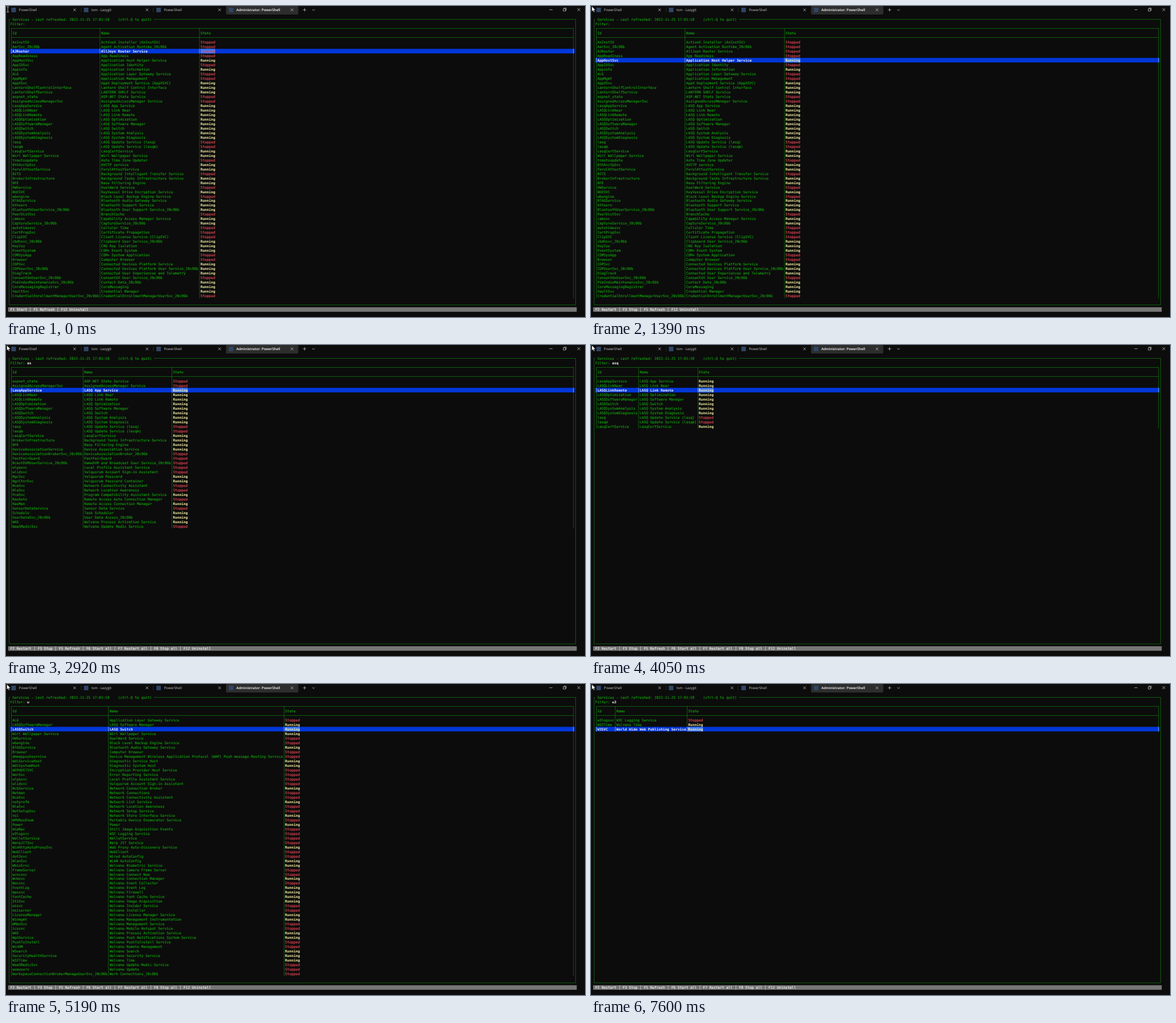
An HTML page for the animation above (8000 ms loop, 1021 by 548 pixels).

```html
<!DOCTYPE html>
<html lang="en">
<head>
<meta charset="utf-8">
<title>Services</title>
<style>
html, body { margin: 0; width: 100%; height: 100%; overflow: hidden; background: #0c0c0c; }
svg { display: block; width: 100%; height: 100%; }
text { white-space: pre; text-rendering: geometricPrecision; font-kerning: none; font-variant-ligatures: none; }
.mono { font-family: "DejaVu Sans Mono", monospace; font-size: 6.192px; stroke-width: .17px; }
.tab { font-family: "Open Sans", sans-serif; font-size: 6.1px; }
.b { font-weight: 700; stroke-width: 0; }
</style>
</head>
<body>
<svg viewBox="0 0 1021 548" preserveAspectRatio="none">
  <g id="bar"></g>
  <g id="screen" class="mono"></g>
  <g id="pointer"></g>
</svg>
<script>
// One service per line: state letter, id, then the name when it differs.
const services = `
SAxInstSV|ActiveX Installer (AxInstSV)
SAarSvc_20c96b|Agent Activation Runtime_20c96b
SAJRouter|AllJoyn Router Service
SAppReadiness|App Readiness
RAppHostSvc|Application Host Helper Service
SAppIDSvc|Application Identity
RAppinfo|Application Information
SALG|Application Layer Gateway Service
SAppMgmt|Application Management
RAppXSvc|AppX Deployment Service (AppXSVC)
RLanternShelfControlInterface|Lantern Shelf Control Interface
RLanternShelfService|LANTERN SHELF Service
Saspnet_state|ASP.NET State Service
SAssignedAccessManagerSvc|AssignedAccessManager Service
RLasqAppService|LASQ App Service
RLASQLinkNear|LASQ Link Near
RLASQLinkRemote|LASQ Link Remote
RLASQOptimization|LASQ Optimization
RLASQSoftwareManager|LASQ Software Manager
RLASQSwitch|LASQ Switch
RLASQSystemAnalysis|LASQ System Analysis
RLASQSystemDiagnosis|LASQ System Diagnosis
Slasq|LASQ Update Service (lasq)
Slasqm|LASQ Update Service (lasqm)
RLasqCertService
RWirl Wallpaper Service
Stzautoupdate|Auto Time Zone Updater
RBthAvctpSvc|AVCTP service
RFerulAttestService
SBITS|Background Intelligent Transfer Service
RBrokerInfrastructure|Background Tasks Infrastructure Service
RBFE|Base Filtering Engine
SDWService|DuelWard Service
RBDESVC|KeyVessel Drive Encryption Service
Swbengine|Block Level Backup Engine Service
RBTAGService|Bluetooth Audio Gateway Service
Rbthserv|Bluetooth Support Service
RBluetoothUserService_20c96b|Bluetooth User Support Service_20c96b
SPeerDistSvc|BranchCache
Rcamsvc|Capability Access Manager Service
RCaptureService_20c96b
Sautotimesvc|Cellular Time
SCertPropSvc|Certificate Propagation
SClipSVC|Client License Service (ClipSVC)
Rcbdhsvc_20c96b|Clipboard User Service_20c96b
RKeyIso|CNG Key Isolation
REventSystem|COM+ Event System
SCOMSysApp|COM+ System Application
SBrowser|Computer Browser
RCDPSvc|Connected Devices Platform Service
RCDPUserSvc_20c96b|Connected Devices Platform User Service_20c96b
RDiagTrack|Connected User Experiences and Telemetry
SConsentUxUserSvc_20c96b|ConsentUX User Service_20c96b
RPimIndexMaintenanceSvc_20c96b|Contact Data_20c96b
RCoreMessagingRegistrar|CoreMessaging
RVaultSvc|Credential Manager
SCredentialEnrollmentManagerUserSvc_20c96b
RCryptSvc|Cryptographic Services
RDsSvc|Data Sharing Service
RDusmSvc|Data Usage
RDcomLaunch|DCOM Server Process Launcher
RDoSvc|Delivery Optimization
RDeviceAssociationService|Device Association Service
RDeviceInstall|Device Install Service
Sdmwappushservice|Device Management Wireless Application Protocol (WAP) Push message Routing Service
SDeviceAssociationBrokerSvc_20c96b|DeviceAssociationBroker_20c96b
RWdiServiceHost|Diagnostic Service Host
RWdiSystemHost|Diagnostic System Host
SFastFairGuard
SWEPHOSTSVC|Encryption Provider Host Service
SWerSvc|Error Reporting Service
SBcastDVRUserService_20c96b|GameDVR and Broadcast User Service_20c96b
Swlpasvc|Local Profile Assistant Service
Swlidsvc|Velquorum Account Sign-in Assistant
RNgcSvc|Velquorum Passcard
RNgcCtnrSvc|Velquorum Passcard Container
RNcbService|Network Connection Broker
SNetman|Network Connections
SNcaSvc|Network Connectivity Assistant
Rnetprofm|Network List Service
SNlaSvc|Network Location Awareness
SNetSetupSvc|Network Setup Service
Rnsi|Network Store Interface Service
SWPDBusEnum|Portable Device Enumerator Service
RPower
RPcaSvc|Program Compatibility Assistant Service
SRasAuto|Remote Access Auto Connection Manager
RRasMan|Remote Access Connection Manager
SSensorDataService|Sensor Data Service
SWiaRpc|Still Image Acquisition Events
RSchedule|Task Scheduler
RUserDataSvc_20c96b|User Data Access_20c96b
Sw3logsvc|W3C Logging Service
SWalletService
SWarpJITSvc|Warp JIT Service
RWinHttpAutoProxySvc|Web Proxy Auto-Discovery Service
SWebClient
Sdot3svc|Wired AutoConfig
RWlanSvc|WLAN AutoConfig
RWbioSrvc|Wolvane Biometric Service
SFrameServer|Wolvane Camera Frame Server
Swcncsvc|Wolvane Connect Now
RWcmsvc|Wolvane Connection Manager
SWecsvc|Wolvane Event Collector
REventLog|Wolvane Event Log
Rmpssvc|Wolvane Firewall
RFontCache|Wolvane Font Cache Service
RStiSvc|Wolvane Image Acquisition
Swisvc|Wolvane Insider Service
Smsiserver|Wolvane Installer
RLicenseManager|Wolvane License Manager Service
RWinmgmt|Wolvane Management Instrumentation
SWManSvc|Wolvane Management Service
Sicssvc|Wolvane Mobile Hotspot Service
RWAS|Wolvane Process Activation Service
RWpnService|Wolvane Push Notifications System Service
SPushToInstall|Wolvane PushToInstall Service
SWinRM|Wolvane Remote Management
RWSearch|Wolvane Search
RSecurityHealthService|Wolvane Security Service
RW32Time|Wolvane Time
SWaaSMedicSvc|Wolvane Update Medic Service
Swuauserv|Wolvane Update
SWorkspaceConnectionBrokerManageUserSvc_20c96b|Work Connections_20c96b
RW3SVC|World Wide Web Publishing Service
Sworkfolderssvc|Work Folders
RLanmanWorkstation|Workstation
SWwanSvc|WWAN AutoConfig
`.trim().split("\n").map(line => {
  const [id, name = id] = line.slice(1).split("|");
  return { id, name, state: line[0] === "R" ? "Running" : "Stopped" };
});

// time, filter, selected row, caret visible
const steps = [
  [0, "", 2, 0], [130, "", 2, 1], [650, "", 2, 0], [1120, "", 3, 0], [1190, "", 3, 1],
  [1390, "", 4, 1], [1860, "", 3, 1], [1990, "", 2, 1], [2520, "", 2, 0],
  [2590, "a", 2, 0], [2720, "a", 2, 1], [2920, "as", 2, 1], [3120, "asq", 2, 1], [3850, "asq", 2, 0],
  [4050, "asq", 2, 1], [4190, "as", 2, 1], [4320, "a", 2, 0], [4460, "a", 2, 1], [4590, "", 2, 1],
  [5120, "", 2, 0], [5190, "w", 2, 0], [5260, "w", 2, 1], [5460, "w3", 2, 1],
  [5930, "w3", 2, 0], [6540, "w3", 2, 1], [7070, "w3", 2, 0], [7600, "w3", 2, 1]
];
const LOOP = 8000, POINTER_AT = 70;

// The terminal grid has cells of 7 by 15 dots and lines one dot wide.
const DOT = .5325, CW = 7 * DOT, CH = 15 * DOT;
const MAX_ROWS = 57, FIRST = 5, LAST_COL = 267;
const GREEN = "#13a10e", BLUE = "#0037da", BRIGHT_BLUE = "#3b78ff", WHITE = "#f2f2f2";
const STATE = { Running: "#f9f1a5", Stopped: "#e74856" };
const cx = col => 3.73 + col * CW;
const cy = row => 19.6 + row * CH;
const midX = col => cx(col) + 3 * DOT;
const midY = row => cy(row) + 7 * DOT;
const $ = id => document.getElementById(id);

const rect = (x, y, w, h, fill, extra = "") =>
  `<rect x="${x}" y="${y}" width="${w}" height="${h}" fill="${fill}" ${extra}/>`;
const text = (col, row, str, fill = GREEN, bold = false) =>
  `<text x="${cx(col)}" y="${cy(row) + 12 * DOT}" fill="${fill}" stroke="${fill}"${bold ? ' class="b"' : ""}>${str}</text>`;
const hline = (x1, x2, y) => rect(x1, y, x2 - x1, DOT, GREEN);
const vline = (x, y1, y2, fill = GREEN) => rect(x, y1, DOT, y2 - y1, fill);
const stroke = (d, color = "#d8d8d8", w = .7) =>
  `<path d="${d}" fill="none" stroke="${color}" stroke-width="${w}"/>`;
const cross = (x, y, r) => stroke(`M${x - r} ${y - r}l${2 * r} ${2 * r}m0 ${-2 * r}l${-2 * r} ${2 * r}`);

function drawBar() {
  const tabs = ["PowerShell", "tsm - Lazygit", "PowerShell", "Administrator: PowerShell"];
  let out = rect(388, 0, 127.5, 15, "#2d2d2d", 'rx="2"');
  tabs.forEach((title, i) => {
    const x = i * 127.8, active = i === 3;
    out += rect(x + 9.5, 3, 8, 8, "#2f4564");
    out += `<text class="tab" x="${x + 22.8}" y="9.3" fill="${active ? "#fff" : "#ccc"}" ` +
      `font-weight="${active ? 600 : 400}">${title}</text>`;
    out += cross(x + 121, 6.8, 2.3);
    if (i < 2) out += rect(Math.floor(x + 132), 3, 1, 8, "#262626");
  });
  out += stroke("M523.6 6.8h5.8m-2.9-2.9v5.8M540 6l2.3 2 2.3-2M958.3 6.6h5.4");
  out += stroke("M982.6 5h4v4h-4zM983.9 4.8v-1.1h4v4h-1.2");
  return out + cross(1010, 6.5, 2.5);
}

function drawFrame() {
  const l = midX(0), r = midX(268), t = midY(0), b = midY(63);
  return hline(l, cx(1), t) + hline(cx(69), r, t) + hline(l, r + DOT, b) + vline(l, t, b) + vline(r, t, b) +
    text(2, 0, "Services - Last refreshed: 2022-11-25 17:01:59    (ctrl-Q to quit)") +
    text(1, 1, "Filter:");
}

function drawStatus(state, filter) {
  const keys = state === "Running" ? ["F2 Restart", "F3 Stop"] : ["F1 Start"];
  keys.push("F5 Refresh");
  if (filter) keys.push("F6 Start all", "F7 Restart all", "F8 Stop all");
  keys.push("F12 Uninstall");
  let out = rect(cx(0), cy(64), 269 * CW, CH, "#767676"), col = 1;
  keys.forEach((key, i) => {
    if (i) {
      out += vline(midX(col + 1), cy(64), cy(65), WHITE);
      col += 3;
    }
    out += text(col, 64, key, WHITE);
    col += key.length;
  });
  return out;
}

function drawTable(rows, selected, caret) {
  const widest = key => Math.max(...rows.map(s => s[key].length));
  const sep1 = 2 + widest("id"), sep2 = sep1 + 1 + widest("name");
  const edges = [1, sep1, sep2, LAST_COL];
  const top = midY(2), left = midX(1), right = midX(LAST_COL) + DOT;
  let out = hline(left, right, top) + hline(left, right, midY(4));
  edges.forEach(col => out += vline(midX(col), top, cy(FIRST + rows.length)));
  out += text(2, 3, "Id") + text(sep1 + 1, 3, "Name") + text(sep2 + 1, 3, "State");

  const hot = FIRST + selected;
  out += rect(cx(1), cy(hot), LAST_COL * CW, CH, BLUE);
  out += rect(cx(sep2 + 1), cy(hot), rows[selected].state.length * CW, CH, BRIGHT_BLUE);
  edges.forEach(col => out += vline(midX(col), cy(hot), cy(hot + 1), WHITE));

  rows.forEach((s, i) => {
    const row = FIRST + i, on = i === selected, color = on ? WHITE : GREEN;
    out += text(2, row, s.id, color, on) + text(sep1 + 1, row, s.name, color, on) +
      text(sep2 + 1, row, s.state, STATE[s.state], s.state === "Running");
  });
  if (caret) out += vline(cx(sep2 + 1), cy(hot), cy(hot + 1), WHITE);
  return out;
}

function drawScreen([, filter, selected, caret]) {
  const has = str => str.toLowerCase().includes(filter);
  const rows = services.filter(s => has(s.id) || has(s.name)).slice(0, MAX_ROWS);
  return drawFrame() + text(9, 1, filter, WHITE, true) +
    drawTable(rows, selected, caret) + drawStatus(rows[selected].state, filter);
}

const beam = stroke("M1.2 1.2h1.3l.7.6.7-.6h1.3M3.2 1.8v8.4M1.2 10.8h1.3l.7-.6.7.6h1.3", "#e8e8e8", .8);
const arrow = '<path d="M1.5.6V9.8L3.6 7.8 5 10.9l1.4-.6L5 7.3h2.8z" fill="#fff" stroke="#000" stroke-width=".4"/>';

$("bar").innerHTML = drawBar();
let shownStep, shownPointer;

function tick() {
  const t = performance.now() % LOOP;
  const step = steps.findLast(s => s[0] <= t);
  const pointer = t < POINTER_AT ? beam : arrow;
  if (step !== shownStep) $("screen").innerHTML = drawScreen(shownStep = step);
  if (pointer !== shownPointer) $("pointer").innerHTML = shownPointer = pointer;
  requestAnimationFrame(tick);
}
tick();
</script>
</body>
</html>
```
